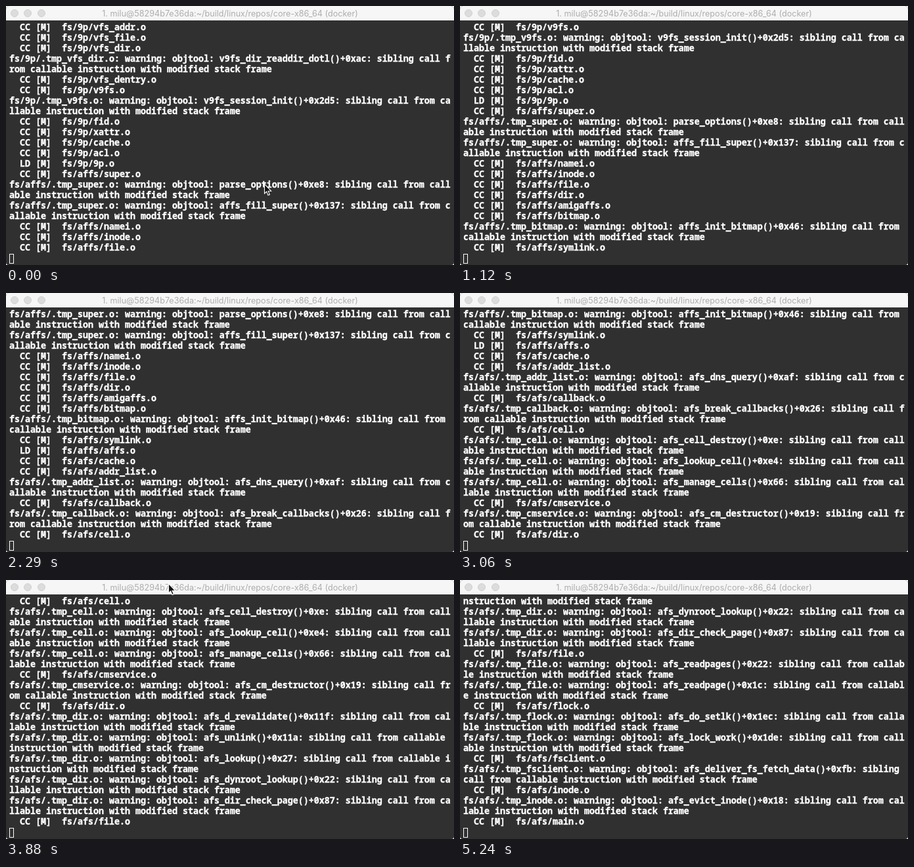
Animation of 682x395 px, one loop 6650 ms. Source, as an HTML page:

```html
<!DOCTYPE html>
<html lang="en">
<head>
<meta charset="utf-8">
<title>Kernel build</title>
<style>
  html, body { margin: 0; width: 100%; height: 100%; overflow: hidden; background: #fff; }
  #window {
    position: relative; width: 682px; height: 395px; overflow: hidden;
    border-radius: 5px 5px 4px 4px; background: #303030;
  }
  #bar {
    position: absolute; inset: 0 0 auto; height: 22px; background: #f6f6f6;
    font: 12.6px/23px Inter, "Open Sans", sans-serif;
    color: #adadad; text-align: center; white-space: pre;
  }
  #bar i {
    position: absolute; top: 5px; width: 12px; height: 12px; box-sizing: border-box;
    border: 1px solid #d0d0d0; border-radius: 50%; background: #dcdcdc;
  }
  #log {
    position: absolute; left: 5px; top: 24px; margin: 0; color: #fff;
    font: 700 13.333px/16px "Noto Sans Mono", "DejaVu Sans Mono", monospace;
    font-variant-ligatures: none; -webkit-text-stroke: .35px #fff;
  }
  #caret {
    position: absolute; left: 5px; top: 378px; width: 7px; height: 15px;
    box-sizing: border-box; border: 1px solid #fff;
  }
  #pointer { position: absolute; left: 0; top: 0; overflow: visible; }
</style>
</head>
<body>
<div id="window">
  <div id="bar"><i style="left:7px"></i><i style="left:27px"></i><i style="left:48px"></i>1. milu@58294b7e36da:~/build/linux/repos/core-x86_64 (docker)</div>
  <pre id="log"></pre>
  <div id="caret"></div>
  <svg id="pointer" width="12" height="19">
    <path d="M.5 .5V15L3.7 12 6 17.6 8.4 16.6 6.1 11.2H10.6Z" fill="#111" stroke="#fff" stroke-width="1.1"/>
  </svg>
</div>
<script>
const LOOP = 6650, COLUMNS = 84, ROWS = 22;

// Each object file, followed by the functions its warnings mention.
const modules = {
  '9p': `vfs_addr vfs_file vfs_dir:v9fs_dir_readdir_dotl+ac vfs_dentry
    v9fs:v9fs_session_init+2d5 fid xattr cache acl`,
  affs: `super:parse_options+e8:affs_fill_super+137 namei inode file dir amigaffs
    bitmap:affs_init_bitmap+46 symlink`,
  afs: `cache addr_list:afs_dns_query+af callback:afs_break_callbacks+26
    cell:afs_cell_destroy+e:afs_lookup_cell+e4:afs_manage_cells+66
    cmservice:afs_cm_destructor+19
    dir:afs_d_revalidate+11f:afs_unlink+11a:afs_lookup+27:afs_dynroot_lookup+22:afs_dir_check_page+87
    file:afs_readpages+22:afs_readpage+1c
    flock:afs_do_setlk+1ec:afs_lock_work+1de
    fsclient:afs_deliver_fs_fetch_data+fb inode:afs_evict_inode+18 main`
};

// Key points: time, then values that change evenly up to the next point.
const progress = [[0, 0], [120, 1], [1120, 4], [2290, 8], [3060, 10], [4410, 13], [5240, 15]];
const pointerPath = [
  [0, 393, 271], [290, 393, 271], [530, 378, 396],
  [3820, 258, 396], [3880, 247, 5], [4120, 247, 5], [4350, 242, -20]
];

function valuesAt(points, time) {
  const index = points.findLastIndex(point => point[0] <= time);
  const [from, ...values] = points[index];
  const [to, ...targets] = points[index + 1] || [LOOP, ...values];
  const part = (time - from) / (to - from);
  return values.map((value, i) => value + (targets[i] - value) * part);
}

const rows = [];
const pauses = []; // row counts at which the log waits for the compiler

function print(text) {
  for (let i = 0; i < text.length; i += COLUMNS) rows.push(text.slice(i, i + COLUMNS));
}

for (const [dir, files] of Object.entries(modules)) {
  for (const entry of files.split(/\s+/)) {
    const [file, ...calls] = entry.split(':');
    print(`  CC [M]  fs/${dir}/${file}.o`);
    if (rows.length >= ROWS) pauses.push(rows.length);
    for (const call of calls) {
      print(`fs/${dir}/.tmp_${file}.o: warning: objtool: ${call.replace('+', '()+0x')}: ` +
        'sibling call from callable instruction with modified stack frame');
    }
  }
  print(`  LD [M]  fs/${dir}/${dir}.o`);
}

const log = document.getElementById('log');
const pointer = document.getElementById('pointer');
let shown = 0;

function draw(time) {
  const printed = pauses[Math.floor(valuesAt(progress, time)[0])];
  if (printed !== shown) {
    log.textContent = rows.slice(printed - ROWS, printed).join('\n');
    shown = printed;
  }
  const [x, y] = valuesAt(pointerPath, time).map(Math.round);
  pointer.style.transform = `translate(${x}px, ${y}px)`;
}

const start = performance.now();
function tick() {
  draw((performance.now() - start) % LOOP);
  requestAnimationFrame(tick);
}
tick();
</script>
</body>
</html>
```
